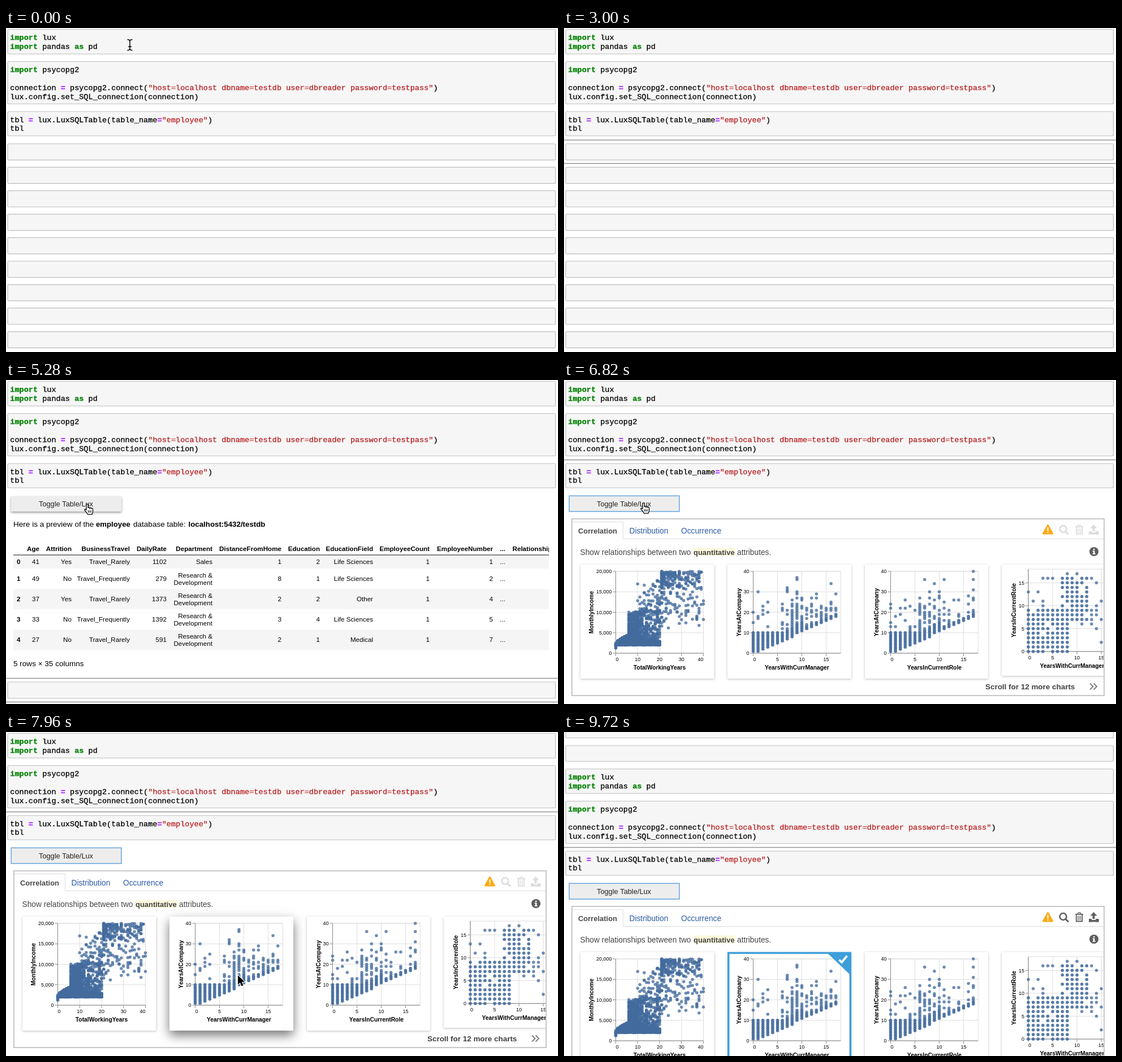
Write an HTML page with a canvas that moves like this. It is 976 px wide and 574 px high and loops after 9.74 s.

```html
<!DOCTYPE html>
<html lang="en">
<head>
<meta charset="utf-8">
<title>Notebook demo</title>
<style>
html, body { margin: 0; width: 100%; height: 100%; overflow: hidden; background: #fff; }
canvas { display: block; }
</style>
</head>
<body>
<canvas id="stage" width="976" height="574"></canvas>
<script>
const W = 976, H = 574, LOOP = 9740;
const SANS = '"Liberation Sans", Arial, sans-serif';
const MONO = '"Liberation Mono", "Courier New", monospace';
const BLUE = '#446c9e';
const screen2d = document.getElementById('stage').getContext('2d');
let g = screen2d;

// moments at which the page changes, in ms
const SHOW_TABLE = 4120, SHOW_CHARTS = 5340, HOVER = 7350, SELECT = 8300, LEAVE = 9050;

// ---------- helpers ----------
const clamp = v => Math.max(0, Math.min(1, v));
const span = (t, a, b) => clamp((t - a) / (b - a));
const ease = p => p * p * (3 - 2 * p);
const mix = (a, b, p) => a + (b - a) * p;

function random(seed) {
  return () => {
    seed = (seed + 0x6D2B79F5) | 0;
    let v = Math.imul(seed ^ (seed >>> 15), 1 | seed);
    v = (v + Math.imul(v ^ (v >>> 7), 61 | v)) ^ v;
    return ((v ^ (v >>> 14)) >>> 0) / 4294967296;
  };
}

// y is the vertical centre of the capitals
function text(s, x, y, size, { bold = false, color = '#000', align = 'left' } = {}) {
  g.font = `${bold ? 'bold ' : ''}${size}px ${SANS}`;
  g.fillStyle = color;
  g.textAlign = align;
  g.fillText(s, x, y + size * 0.35);
}

function line(color, width, ...xy) {
  g.strokeStyle = color;
  g.lineWidth = width;
  g.beginPath();
  for (let i = 0; i < xy.length; i += 2) g.lineTo(xy[i], xy[i + 1]);
  g.stroke();
}

function box(x, y, w, h, color) {
  g.fillStyle = color;
  g.fillRect(x, y, w, h);
}

function disc(x, y, r) {
  g.beginPath();
  g.arc(x, y, r, 0, 7);
  g.fill();
}

function at(x, y, draw) {
  g.save();
  g.translate(x, y);
  draw();
  g.restore();
}

// ---------- notebook cells ----------
function cell(top, bottom) {
  g.beginPath();
  g.roundRect(3, top, 968.5, bottom - top, 2);
  g.fillStyle = '#f6f6f6';
  g.fill();
  g.strokeStyle = '#bdbdbd';
  g.lineWidth = 1.2;
  g.stroke();
}

const INK = { k: '#008000', o: '#aa22ff', s: '#ba2121', n: '#000' };

// the first letter of each part names its ink
function code(y, ...parts) {
  let x = 7.3;
  g.textAlign = 'left';
  g.lineWidth = 0.3;
  for (const part of parts) {
    const kind = part[0], s = part.slice(1);
    g.font = `${'ko'.includes(kind) ? 'bold ' : ''}13.55px ${MONO}`;
    g.fillStyle = g.strokeStyle = INK[kind];
    g.fillText(s, x, y);
    g.strokeText(s, x, y);
    x += s.length * 8.133;
  }
}

function codeCells() {
  cell(-100, -52.5);
  cell(-39, -11);
  cell(2.5, 46);
  code(21, 'kimport', 'n lux');
  code(37, 'kimport', 'n pandas ', 'kas', 'n pd');
  cell(59.5, 134.5);
  code(78, 'kimport', 'n psycopg2');
  code(109.5, 'nconnection ', 'o=', 'n psycopg2.connect(',
    's"host=localhost dbname=testdb user=dbreader password=testpass"', 'n)');
  code(125.5, 'nlux.config.set_SQL_connection(connection)');
  cell(148, 191);
  code(166.5, 'ntbl ', 'o=', 'n lux.LuxSQLTable(table_name', 'o=', 's"employee"', 'n)');
  code(182, 'ntbl');
}

function emptyCells() {
  for (let i = 0; i < 9; i++) {
    const top = 205 + 41.6 * i;
    cell(top, top + 28.8);
  }
}

// rules above and below the selected cell
function rulers(t) {
  if (t < 20) return [];
  if (t < 880) return [53, 141.5];
  if (t < 1200) return [141.5, 198.5];
  if (t < SHOW_TABLE) return [198.5, 240];
  if (t < SHOW_CHARTS) return [528.5, 570.5];
  return [141.5];
}

function button(hover, focus) {
  g.save();
  if (hover) {
    g.shadowColor = 'rgba(0,0,0,.4)';
    g.shadowBlur = 4;
    g.shadowOffsetY = 2;
  }
  box(9, 205.5, 195, 27.5, '#ededed');
  g.restore();
  if (focus) {
    g.strokeStyle = '#5c9fdc';
    g.lineWidth = 1.4;
    g.strokeRect(9.2, 205.2, 194.8, 27.8);
  }
  text('Toggle Table/Lux', 106, 219.5, 12.8, { align: 'center', color: '#222' });
}

// ---------- table preview ----------
const HEADS = ['Age', 'Attrition', 'BusinessTravel', 'DailyRate', 'Department', 'DistanceFromHome',
  'Education', 'EducationField', 'EmployeeCount', 'EmployeeNumber', '...'];
const RIGHTS = [59, 116, 219, 284, 365, 487, 555, 649, 749, 861, 883];
const ROWS = [
  '41,Yes,Travel_Rarely,1102,Sales,1,2,Life Sciences,1,1,...',
  '49,No,Travel_Frequently,279,Research &|Development,8,1,Life Sciences,1,2,...',
  '37,Yes,Travel_Rarely,1373,Research &|Development,2,2,Other,1,4,...',
  '33,No,Travel_Frequently,1392,Research &|Development,3,4,Life Sciences,1,5,...',
  '27,No,Travel_Rarely,591,Research &|Development,2,1,Medical,1,7,...'
];

function table() {
  const size = 11.65, right = { align: 'right' }, strong = { align: 'right', bold: true };
  text('Here is a preview of the ', 13, 255.5, 13.55);
  text('employee', 159, 255.5, 13.2, { bold: true });
  text('database table:', 225, 255.5, 13.55);
  text('localhost:5432/testdb', 322.5, 255.5, 13.3, { bold: true });

  HEADS.forEach((s, i) => text(s, RIGHTS[i], 298.5, size, strong));
  g.save();
  g.beginPath();
  g.rect(890, 285, 70, 25);
  g.clip();
  text('RelationshipSatisfaction', 895.5, 298.5, size, { bold: true });
  g.restore();

  ROWS.forEach((row, r) => {
    const top = r ? 298 + 36.1 * r : 310.5, bottom = 334 + 36.1 * r;
    const y = (top + bottom) / 2;
    if (r % 2 === 0) box(13, top, 947, bottom - top, '#f5f5f5');
    text(String(r), 25.5, y, size, strong);
    row.split(',').forEach((value, i) => {
      const lines = value.split('|');
      lines.forEach((s, k) => text(s, RIGHTS[i], y + (k - (lines.length - 1) / 2) * 13.2, size, right));
    });
  });
  line('#111', 1.2, 13, 310, 960, 310);
  text('5 rows × 35 columns', 13, 502.5, 13.55);
}

// ---------- scatter charts ----------
function axes(c) {
  const bottom = c.y0, left = c.x0, right = c.x0 + c.xMax * c.sx, top = c.y0 - c.yMax * c.sy;
  g.strokeStyle = '#ddd';
  g.lineWidth = 1;
  g.strokeRect(left, top, right - left, bottom - top);
  for (let v = 0; v <= c.xMax; v += c.xStep) {
    const x = left + v * c.sx;
    line('#ddd', 1, x, top, x, bottom);
    line('#888', 1, x, bottom, x, bottom + 5);
    const align = v === 0 ? 'left' : v === c.xMax ? 'right' : 'center';
    text(String(v), x, bottom + 11, 9, { align });
  }
  for (let v = 0; v <= c.yMax; v += c.yStep) {
    const y = bottom - v * c.sy;
    line('#ddd', 1, left, y, right, y);
    line('#888', 1, left - 5, y, left, y);
    text(v.toLocaleString('en-US'), left - 7, y, 9, { align: 'right' });
  }
  line('#888', 1, left, top, left, bottom, right, bottom);
  const label = { bold: true, align: 'center' };
  text(c.xName, (left + right) / 2, bottom + 25, 10.3, label);
  at(c.titleX, (top + bottom) / 2, () => {
    g.rotate(-Math.PI / 2);
    text(c.yName, 0, 0, 10.3, label);
  });
}

function plotter(c) {
  return (x, y, alpha = 0.78) => {
    g.globalAlpha = alpha;
    g.fillStyle = BLUE;
    disc(c.x0 + x * c.sx, c.y0 - y * c.sy, 2.75);
    g.globalAlpha = 1;
  };
}

// pay levels: early pay is capped by a rising line, senior pay starts after 20 years
function incomeDots(dot) {
  const rnd = random(11);
  const level = (n, from, to, xSkew, low, high, ySkew) => {
    for (let i = 0; i < n; i++) {
      const year = from + Math.floor((to - from + 1) * rnd() ** xSkew);
      const top = year < 6 ? Math.min(high, 2800 + 330 * year) : high;
      dot(year, mix(low, top, rnd() ** ySkew));
    }
  };
  level(12, 0, 0, 1, 1000, 2900, 1);
  level(900, 1, 10, 0.7, 2000, 7000, 1.2);
  level(170, 6, 10, 1, 5000, 10100, 1);
  level(400, 11, 20, 1.2, 2000, 10500, 1.9);
  level(70, 9, 20, 0.7, 10000, 17800, 2);
  level(190, 21, 39, 1.7, 15600, 20000, 0.8);
  level(85, 21, 40, 1.5, 6000, 15000, 0.6);
}

// tenure never falls below the years in the role, and thins out above it
function tenureDots(dot, seed, firstBusy) {
  const rnd = random(seed);
  for (let x = 0; x <= 17; x++) {
    const low = Math.max(1, x > 8 ? x + 1 : x);
    for (let y = low; y <= 40; y++) {
      const solid = y <= 10 || (x >= 7 && y < low + (x < 11 ? 5 : 2));
      const base = x < firstBusy ? 0.12 : x < 11 ? 0.65 : 0.45;
      const p = solid ? 1 : base * Math.exp(-Math.max(0, y - 22) / 6);
      if (rnd() > p) continue;
      dot(x, y);
      if (solid) dot(x, y, 0.6);
    }
  }
}

// two overlapping blocks with strays around them
function gridDots(dot) {
  const rnd = random(5);
  for (let x = 0; x <= 15; x++)
    for (let y = 0; y <= 17; y++) {
      const early = x <= 8 && y <= 9;
      const late = x >= 7 && x <= 12 && y >= 7 && y <= 16;
      const near = x > 12 && y > 5 && y < 12;
      if (rnd() > (early ? 0.95 : late ? 0.82 : near ? 0.4 : 0.09)) continue;
      dot(x, y);
      if (early || late) dot(x, y, 0.5);
    }
}

const tenureAxes = { y0: 484, sx: 8.6, sy: 3.625, xMax: 18, yMax: 40, xStep: 5, yStep: 10, yName: 'YearsAtCompany' };
const CHARTS = [
  [{ x0: 91.5, y0: 484, sx: 3.875, sy: 0.00725, xMax: 40, yMax: 20000, xStep: 10, yStep: 5000,
    xName: 'TotalWorkingYears', yName: 'MonthlyIncome', titleX: 48 }, incomeDots],
  [{ ...tenureAxes, x0: 334.5, xName: 'YearsWithCurrManager', titleX: 309 }, dot => tenureDots(dot, 21, 7)],
  [{ ...tenureAxes, x0: 577.5, xName: 'YearsInCurrentRole', titleX: 552 }, dot => tenureDots(dot, 34, 6)],
  [{ x0: 821, y0: 481, sx: 8.6, sy: 8.11, xMax: 18, yMax: 18, xStep: 5, yStep: 5,
    xName: 'YearsWithCurrManager', yName: 'YearsInCurrentRole', titleX: 795 }, gridDots]
];

function chartLayer() {
  const layer = document.createElement('canvas');
  layer.width = 954;
  layer.height = H;
  g = layer.getContext('2d');
  for (const [c, fill] of CHARTS) {
    axes(c);
    fill(plotter(c));
  }
  g = screen2d;
  return layer;
}
const charts = chartLayer();

// ---------- chart panel ----------
function warning() {
  g.fillStyle = g.strokeStyle = '#fbab18';
  g.lineJoin = 'round';
  g.lineWidth = 3;
  g.beginPath();
  g.moveTo(855.5, 257.5);
  g.lineTo(863.5, 272);
  g.lineTo(847.5, 272);
  g.closePath();
  g.fill();
  g.stroke();
  line('#fff', 2, 855.5, 261, 855.5, 267.5);
  box(854.5, 269, 2, 2, '#fff');
  g.lineJoin = 'miter';
}

function tools(color) {
  g.strokeStyle = color;
  g.lineWidth = 2.5;
  g.beginPath();
  g.arc(882.5, 264, 5.9, 0, 7);
  g.stroke();
  line(color, 3, 886.7, 268.2, 892, 273.5);

  line(color, 1.8, 904, 260, 918, 260);
  line(color, 1.5, 908, 259.5, 909, 257.3, 913, 257.3, 914, 259.5);
  line(color, 1.8, 905.8, 260, 905.8, 272.5, 916.2, 272.5, 916.2, 260);
  for (const x of [908.6, 911, 913.4]) line(color, 1.1, x, 262.5, x, 270.5);

  g.fillStyle = color;
  g.beginPath();
  g.moveTo(936.5, 256);
  g.lineTo(942.5, 262.5);
  g.lineTo(930.5, 262.5);
  g.fill();
  box(934.5, 262, 4, 6, color);
  box(928, 268, 5, 5.5, color);
  box(940, 268, 5.5, 5.5, color);
  box(928, 270, 17.5, 3.5, color);
}

function info() {
  g.fillStyle = '#5c5c5c';
  disc(937, 304, 8);
  box(935.8, 298.8, 2.6, 2.4, '#fff');
  box(935.8, 302.4, 2.6, 6, '#fff');
  box(934.4, 302.4, 2, 1.4, '#fff');
  box(934.4, 307.2, 5.4, 1.5, '#fff');
}

function card(x, right, bottom, lift) {
  g.save();
  g.shadowColor = `rgba(0,0,0,${mix(0.25, 0.55, lift)})`;
  g.shadowBlur = mix(4, 18, lift);
  g.shadowOffsetY = mix(1, 8, lift);
  box(x, 327, right - x, bottom - 327, '#fff');
  g.restore();
}

function selection(t) {
  const p = span(t, LEAVE, LEAVE + 250);
  const color = `rgb(${mix(146, 60, p)},${mix(199, 158, p)},${mix(235, 218, p)})`;
  g.globalAlpha = span(t, SELECT, SELECT + 100);
  g.strokeStyle = color;
  g.lineWidth = 3.4;
  g.strokeRect(290.8, 328.5, 215.5, 198.5);
  g.fillStyle = color;
  g.beginPath();
  g.moveTo(464, 327);
  g.lineTo(508, 327);
  g.lineTo(508, 369);
  g.fill();
  line('#fff', 3.8, 486.5, 340.5, 491, 345, 500.5, 333.5);
  g.globalAlpha = 1;
}

function panel(t) {
  const gray = '#ddd';
  g.strokeStyle = '#ababab';
  g.lineWidth = 1.3;
  g.strokeRect(14, 246, 941, 313);
  line(gray, 1, 105, 281.5, 954, 281.5);
  line(gray, 1, 15, 251.5, 104.5, 251.5, 104.5, 281.5);
  text('Correlation', 25, 267.5, 12.95, { bold: true, color: '#4a4a4a' });
  text('Distribution', 115.5, 267.5, 13.75, { color: '#2a5aa5' });
  text('Occurrence', 207, 267.5, 13.75, { color: '#2a5aa5' });
  warning();
  tools(t >= SELECT ? '#606060' : '#dcdcdc');

  text('Show relationships between two ', 28.5, 305, 13.72, { color: '#444' });
  box(229, 297.5, 74, 14, '#fcf8dc');
  text('quantitative', 229, 305, 12.95, { bold: true, color: '#444' });
  text('attributes.', 306, 305, 13.72, { color: '#444' });
  info();

  const lift = span(t, HOVER, HOVER + 250) * (1 - span(t, LEAVE, LEAVE + 250));
  g.save();
  g.beginPath();
  g.rect(15, 283, 939, 275);
  g.clip();
  card(29, 265.5, 529, 0);
  card(532, 750, 529, 0);
  card(774, 1000, 524, 0);
  card(289, 508, 529, lift);
  g.drawImage(charts, 0, 0);
  if (t >= SELECT) selection(t);
  g.restore();

  text('Scroll for 12 more charts', 745, 543.5, 13.45, { bold: true, color: '#404040' });
  for (const x of [930, 936.5]) line('#7a7a7a', 1.8, x, 537.5, x + 5.5, 543, x, 548.5);
}

// ---------- pointers ----------
const HAND = new Path2D('M4.5 12V2.2a1.6 1.6 0 0 1 3.2 0V8a1.5 1.5 0 0 1 3 .2 1.5 1.5 0 0 1 2.8 .5 ' +
  '1.4 1.4 0 0 1 2.5 .9V14c0 2-1 3-1.5 5.2H7c-.5-2-3-4.5-5.2-7.2-1.2-1.6 .8-3 2.7-1.2z');
const ARROW = new Path2D('M0 0V16.5L3.9 12.9 6.7 19.3 9.5 18.1 6.8 11.8H12z');

function beam() {
  g.lineCap = 'round';
  for (const s of [-1, 1]) line('#000', 1.4, -4, s * 9.5, -1.5, s * 9, 0, s * 7.5, 1.5, s * 9, 4, s * 9.5);
  line('#000', 1.5, 0, -8, 0, 8);
  line('#000', 1.3, -2.5, 3, 2.5, 3);
  g.lineCap = 'butt';
}

function hand() {
  g.fillStyle = '#fff';
  g.fill(HAND);
  g.strokeStyle = '#000';
  g.lineWidth = 1.3;
  g.stroke(HAND);
  for (const x of [8, 10.3, 12.6]) line('#000', 1, x, 12, x, 16);
}

function arrow() {
  g.strokeStyle = '#fff';
  g.lineWidth = 2;
  g.stroke(ARROW);
  g.fillStyle = '#000';
  g.fill(ARROW);
}

// each move: start, end, x, y
const MOVES = [[4500, 5040, 141, 219], [6000, 6080, 138, 217], [6840, 7780, 410, 431],
  [8000, 8280, 404, 437], [8920, 9280, 520, 590]];

function pointer(t) {
  if (t < 40) return at(219, 30, beam);
  if (t < 3040) return;
  let x = 29, y = 262;
  for (const [from, to, toX, toY] of MOVES) {
    const p = ease(span(t, from, to));
    x = mix(x, toX, p);
    y = mix(y, toY, p);
  }
  const overButton = t > SHOW_TABLE && x < 204 && y < 233;
  if (overButton) at(x - 3.5, y, hand);
  else at(x, y, t < SHOW_CHARTS ? beam : arrow);
}

// ---------- frame ----------
function draw(t) {
  const scroll = 63 * ease(span(t, 9300, 9700));
  box(0, 0, W, H, '#fff');
  at(0, scroll, () => {
    codeCells();
    if (t < SHOW_TABLE) emptyCells();
    else if (t < SHOW_CHARTS) {
      button(t > 4820, false);
      table();
      cell(535, 564);
    } else {
      button(false, true);
      panel(t);
    }
    for (const y of rulers(t)) line('#98949a', 1.3, 0, y, W, y);
  });
  pointer(t);
}

const start = performance.now();
function tick() {
  draw((performance.now() - start) % LOOP);
  requestAnimationFrame(tick);
}
tick();
</script>
</body>
</html>
```
